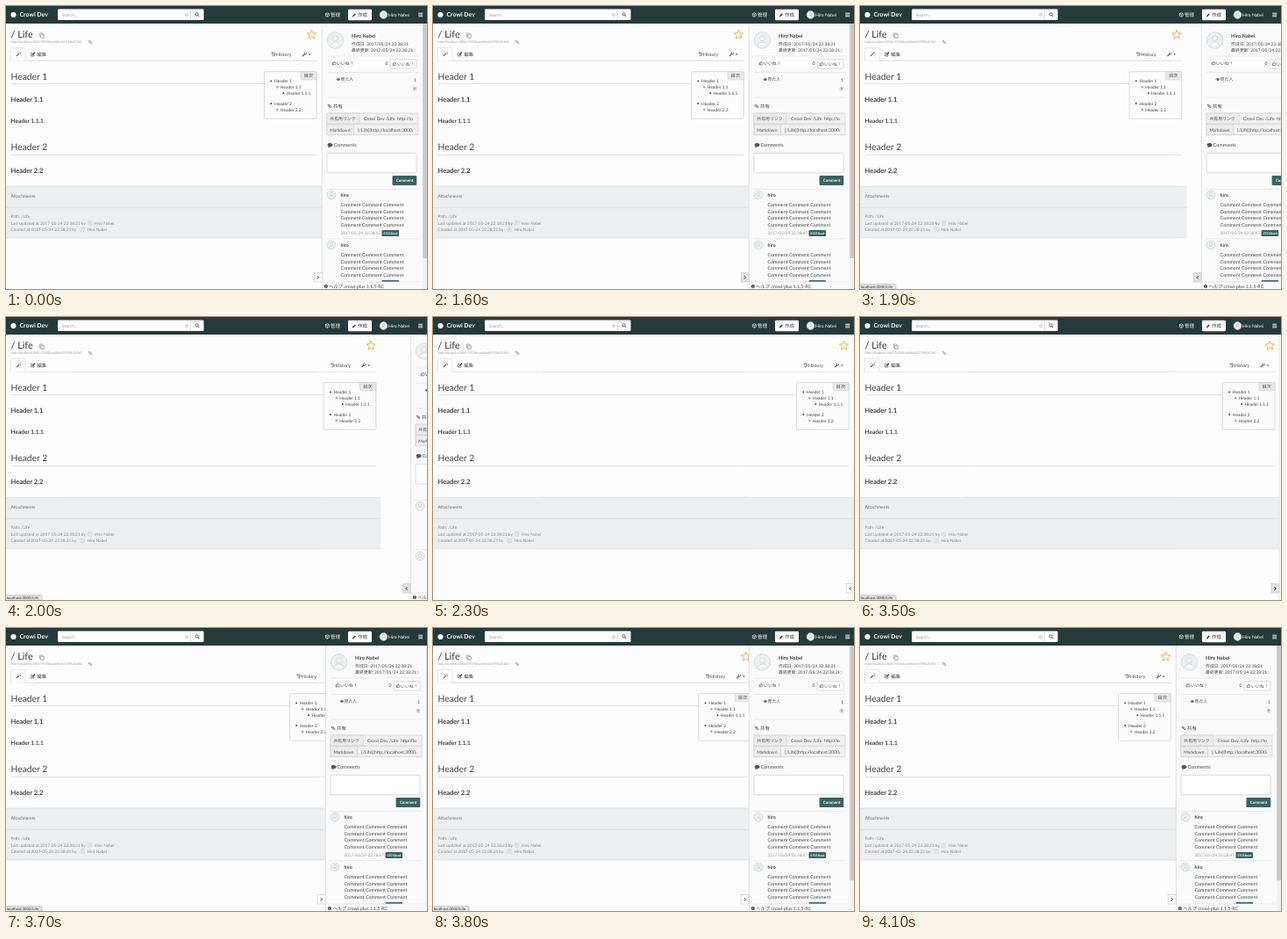
These frames come from a looping animation (480x322 px, 5700 ms). An HTML page:

```html
<!DOCTYPE html>
<html>
<head>
<meta charset="utf-8">
<title>Wiki page with sliding sidebar</title>
<style>
html, body { margin: 0; height: 100%; overflow: hidden; background: #fdfdfd; }
svg { display: block; width: 100vw; height: 100vh; }
text { font-family: Lato, "Noto Sans CJK JP", "Noto Sans CJK", sans-serif; text-rendering: geometricPrecision; white-space: pre; }
</style>
</head>
<body>
<svg id="stage" viewBox="0 0 480 322"></svg>
<script>
const LOOP = 5700, TRAVEL = 120, PANEL_X = 360;
const INK = '#444', GREY = '#888', TEAL = '#3b6164', LINE = '#ddd';
const USER = 'Hiro Nabei', LOGIN = 'hiro';

// Drawing helpers
const text = (x, y, size, str, fill = INK, weight = 400) =>
  `<text x="${x}" y="${y}" font-size="${size}" fill="${fill}" font-weight="${weight}">${str}</text>`;
const rect = (x, y, w, h, fill, stroke = 'none', r = 0) =>
  `<rect x="${x}" y="${y}" width="${w}" height="${h}" fill="${fill}" stroke="${stroke}" stroke-width=".7" rx="${r}"/>`;
const dot = (x, y, r, fill, stroke = 'none', w = .6) =>
  `<circle cx="${x}" cy="${y}" r="${r}" fill="${fill}" stroke="${stroke}" stroke-width="${w}"/>`;
const path = (d, stroke = INK, w = .8, fill = 'none') =>
  `<path d="${d}" fill="${fill}" stroke="${stroke}" stroke-width="${w}"/>`;
const at = (x, y, body) => `<g transform="translate(${x} ${y})">${body}</g>`;

const avatar = (x, y, r, edge = '#aab4b6') => at(x, y,
  dot(0, 0, r, '#eceff0', '#c6cdcf') +
  dot(0, -r * .22, r * .3, '#fff', edge, .5) +
  path(`M${-r * .55} ${r * .6}Q0 ${-r * .2} ${r * .55} ${r * .6}`, edge, .5, '#fff'));
const pencil = (x, y, color) => at(x, y,
  path('M-1.3 1.3L1.2-1.2', color, 1.5) + path('M-2 2l.3-1.2.9.9z', color, .3, color));
const thumb = (x, y, color = INK) => at(x, y,
  path('M-2-.3h1v2.2h-1zM-1-.2L.2-2q.9 0 .4 1.6H2q.3 1.5-.5 2.2H-1', color, .5));
const link = (x, y, color = INK) => at(x, y,
  `<g transform="rotate(45)">${rect(-2.3, -.8, 2.4, 1.6, 'none', color, .8)}${rect(-.1, -.8, 2.4, 1.6, 'none', color, .8)}</g>`);
const star = (x, y, r) => {
  const points = Array.from({ length: 10 }, (_, i) => {
    const a = i * Math.PI / 5, k = i % 2 ? r * .45 : r;
    return `${x + k * Math.sin(a)} ${y - k * Math.cos(a)}`;
  });
  return path(`M${points.join('L')}Z`, '#efa83c', .9);
};

const header =
  rect(0, 0, 480, 20, '#263a3b') +
  dot(8.5, 10, 3.1, '#fff') +
  text(15.5, 12.3, 6.9, 'Crowi Dev', '#fff', 700) +
  rect(59, 3.5, 166.5, 12.5, '#fff', 'none', 1.2) +
  text(63.5, 11.7, 4.9, 'Search...', '#999') +
  dot(206, 10, 1.7, 'none', '#aaa', .5) + path('M205.3 9.3l1.4 1.4m0-1.4l-1.4 1.4', '#aaa', .4) +
  path('M210.5 3.5v12.5', '#ccc', .6) +
  dot(217.6, 9.4, 1.6, 'none', '#333', .8) + path('M218.8 10.6l1.5 1.5', '#333', .9) +
  path('M366.3 7.7l2 1v2.6l-2 1-2-1V8.7zM364.3 8.7l2 1 2-1M366.3 9.7v2.6', '#fff', .6) +
  text(370, 11.9, 5.5, '管理', '#fff') +
  rect(390, 3.7, 27, 12.6, '#fff', 'none', 1.2) +
  pencil(397, 10.2, '#333') + text(401, 12, 5.5, '作成', '#333') +
  avatar(430.5, 10, 4.4) + text(436, 12, 5.1, USER, '#fff') +
  path('M470.2 8.2h5M470.2 10h5M470.2 11.8h5', '#fff', .9);

// Rules are drawn twice, once shifted, so that they stretch with the page.
const rules =
  rect(0, 205, 360, 59, '#edeeef') +
  path('M0 205.2h360M0 229.4h360M0 263.8h360', '#dcdedf', .7) +
  path('M5 62.3h350', LINE, .7) +
  path('M6 88.5h348M6 169.5h348', LINE, .8);

const title =
  text(5.5, 36.3, 10.8, '/ Life', '#333') +
  rect(38.2, 31, 3.6, 4, '#fdfdfd', GREY, .4) + rect(39.7, 32.4, 3.6, 4, '#fdfdfd', GREY, .4) +
  text(5.5, 42.3, 3.55, 'http://localhost:3000/59258cadd4bd45f7f9b202b0', '#999') +
  link(96, 41, GREY) +
  path('M5.4 62.6V47.6h16.6v15', LINE, .7, '#fdfdfd') +
  path('M11.9 57.1l3.2-3.2', '#333', 1) + path('M16 51.9v1.7M17.2 54.5h-1.3M13.4 52.2l.8.8', '#333', .6) +
  path('M32 55.3v1.7h-3.4v-3.6h2', INK, .6) + pencil(31.8, 54, INK) +
  text(35.3, 57.1, 5.4, '編集');

const article =
  text(5.5, 83.8, 10.3, 'Header 1', '#444') +
  text(5.5, 109.3, 7.55, 'Header 1.1', '#444', 700) +
  text(5.5, 132.8, 6.55, 'Header 1.1.1', '#444', 700) +
  text(5.5, 164.3, 10.3, 'Header 2', '#444') +
  text(5.5, 189.8, 7.55, 'Header 2.2', '#444', 700) +
  text(5.5, 217.6, 4.95, 'Attachments', GREY, 700) +
  text(5.5, 241.3, 4.75, 'Path: /Life', GREY) +
  text(5.5, 248.6, 4.75, 'Last updated at 2017-05-24 22:38:21 by', GREY) +
  avatar(95.5, 247, 2.7) + text(101, 248.6, 4.75, USER, GREY) +
  text(5.5, 255.9, 4.75, 'Created at 2017-05-24 22:38:21 by', GREY) +
  avatar(87.3, 254.3, 2.7) + text(92.5, 255.9, 4.75, USER, GREY);

const tocItems = [[0, 87.2, '1'], [1, 94.1, '1.1'], [2, 101, '1.1.1'], [0, 112.8, '2'], [1, 119.7, '2.2']];
const bullet = (level, x, y) => [
  dot(x, y, .9, '#333'), dot(x, y, .8, '#fff', '#333', .5), rect(x - .8, y - .8, 1.6, 1.6, '#333')][level];
const rightSide =
  star(348.5, 32.7, 5.4) +
  path('M303.6 53.3a2 2 0 1 1-.2 2.6M303.2 52.6v1.6h1.6M305.3 53.8v1.4h1.1', INK, .6) +
  text(308, 57, 5.3, 'History') +
  path('M338 57.2l2.6-2.6', INK, 1.1) + path('M342.5 53.2a1.3 1.3 0 1 1-1.4-.6', INK, .8) +
  path('M344.8 54.6h2.8l-1.4 1.5z', INK, 0, INK) +
  rect(294.5, 74.7, 59.8, 53.6, '#fcfcfc', '#ccc', 1) +
  path('M336 74.7h17.3q1 0 1 1v8.1H337q-1 0-1-1z', '#ccc', .6, '#e9e9e9') +
  text(339.5, 81.3, 5.3, '目次') +
  tocItems.map(([level, y, n]) =>
    bullet(level, 302.3 + level * 7, y - 1.8) + text(306 + level * 6.8, y, 4.9, 'Header ' + n)).join('');

const shareRow = (y, split, label, x, value) =>
  rect(6, y, 104, 12, '#f0f0f0', '#d0d0d0') +
  rect(6, y, split - 6, 12, '#ebebeb', '#d0d0d0') +
  text(9.3, y + 7.9, 4.9, label, '#555') +
  `<g clip-path="url(#field)">${text(x, y + 7.9, 5.1, value, '#555')}</g>`;

const comment = y => at(0, y,
  avatar(11, 7, 5) +
  text(21.5, 8.8, 5.3, LOGIN, '#444', 700) +
  [20, 27.5, 35, 42.5].map(line => text(21.5, line, 5.35, 'Comment Comment Comment')).join('') +
  text(21.5, 52, 4.65, '2017/05/24 22:38:47', '#999') +
  rect(68.5, 47, 19.5, 7, TEAL, 'none', .8) +
  text(70.3, 51.9, 3.6, '59258cad', '#fff', 700));

// The panel and its toggler are laid out from the panel's left edge.
const panel =
  rect(0, 20, 125, 302, '#fafafa') +
  path('M.3 20v302', '#d8d8d8', .7) +
  avatar(15.5, 39, 9.3) +
  text(34, 36.2, 5.7, USER, '#444', 700) +
  text(34, 45.3, 4.9, '作成日: 2017/05/24 22:38:21') +
  text(34, 52.3, 4.9, '最終更新: 2017/05/24 22:38:21') +
  dot(105, 50.6, 1.6, 'none', '#bbb', .5) +
  path('M6 57h104M6 75.5h104M6 104h104', '#e3e3e3', .6) +
  thumb(14, 65) + text(17, 66.9, 4.9, 'いいね！') +
  text(72.5, 67, 5.1, '0') +
  rect(78, 60.7, 30, 10.3, '#fff', '#ccc', 1) + thumb(83, 65.8) + text(86, 67.7, 4.9, 'いいね！') +
  path('M16.6 83.5q2.2-2.8 4.4 0q-2.2 2.8-4.4 0z', INK, .6) + dot(18.8, 83.5, .9, INK) +
  text(21.5, 85.4, 4.9, '見た人') +
  text(105, 85.6, 5.1, '1') +
  avatar(106, 94, 2.3, '#555') +
  link(9, 113.8) + text(13, 115.8, 5.5, '共有') +
  shareRow(122, 43, '共有用リンク', 48, 'Crowi Dev /Life  http://localhost') +
  shareRow(134.8, 36.5, 'Markdown', 41, '[/Life](http://localhost:3000/592') +
  path('M9.3 156c4 0 4 4.2 0 4.2l-2 .9.5-1.6c-2-1.2-1-3.5 1.5-3.5z', '#555', .3, '#555') +
  text(13.5, 159.9, 5.5, 'Comments') +
  rect(6, 167.3, 102, 22.5, '#fff', '#ccc', 1) +
  rect(80.5, 193, 27.7, 11, TEAL, 'none', 1) + text(84.8, 200.1, 4.5, 'Comment', '#fff', 700) +
  path('M5 208.4h105M5 264.8h105', '#e0e0e0', .6) +
  comment(208) + comment(265) +
  rect(.7, 313.8, 124, 9, '#fafafa') + path('M.7 314h114', '#e0e0e0', .5) +
  dot(4.8, 319, 2.1, '#444') + text(3.7, 320.5, 3.8, '?', '#fff', 700) +
  text(8.3, 320.9, 5.25, 'ヘルプ crowi-plus 1.1.5-RC') +
  rect(114.8, 20, 5.2, 302, '#f1f1f1') + rect(115.2, 20, 4.8, 267, '#c9c9c9');

const toggler =
  `<rect id="knob" x="-8.8" y="303.4" width="9" height="10.6" stroke="#ccc" stroke-width=".7"/>` +
  `<path id="arrow" fill="none" stroke="#333" stroke-width="1"/>`;

const status = rect(-.5, 316.4, 41.5, 6, '#e4e4e4', '#bbb', .6) + text(.8, 320.9, 4.25, 'localhost:3000/Life', '#333');

const $ = id => document.getElementById(id);
$('stage').innerHTML =
  `<clipPath id="field"><rect x="36" y="120" width="68" height="30"/></clipPath>` +
  rect(0, 0, 480, 322, '#fdfdfd') +
  `<g id="rules">${rules}</g><use id="stretch" href="#rules"/>` +
  title + article +
  `<g id="right">${rightSide}</g>` +
  `<g id="panel">${panel}${toggler}</g>` +
  `<g id="status">${status}</g>` + header;

// cubic-bezier(.25, .1, .25, 1), solved by bisection
function ease(x) {
  if (x <= 0) return 0;
  if (x >= 1) return 1;
  const curve = (a, b, s) => 3 * a * s * (1 - s) ** 2 + 3 * b * s * s * (1 - s) + s ** 3;
  let low = 0, high = 1;
  for (let i = 0; i < 24; i++) {
    const mid = (low + high) / 2;
    if (curve(.25, .25, mid) < x) low = mid; else high = mid;
  }
  return curve(.1, 1, low);
}

// Distance moved right, for a transition of the given length in ms
const shift = (t, duration) => TRAVEL * (t < 3500
  ? ease((53 + 1.1 * (t - 1900)) / duration)
  : 1 - ease((10 + 1.1 * (t - 3500)) / duration));
const move = (id, x) => $(id).setAttribute('transform', `translate(${x} 0)`);
const within = (t, from, to) => t >= from && t < to;

function draw(time) {
  const t = Math.floor(time % LOOP / 100) * 100;
  const page = shift(t, 500);
  move('stretch', page);
  move('right', page);
  move('panel', PANEL_X + shift(t, 300));
  const hover = within(t, 1600, 2200) || within(t, 3100, 3600);
  $('knob').setAttribute('fill', hover ? '#dfe1e2' : '#fff');
  $('arrow').setAttribute('d', within(t, 1900, 3500) ? 'M-3.5 307l-1.7 1.8 1.7 1.8' : 'M-5.2 307l1.7 1.8-1.7 1.8');
  const hinted = within(t, 1700, 2300) || within(t, 3200, 4000);
  $('status').setAttribute('visibility', hinted ? 'visible' : 'hidden');
}

const start = performance.now();
function tick() {
  draw(performance.now() - start);
  requestAnimationFrame(tick);
}
tick();
</script>
</body>
</html>
```
